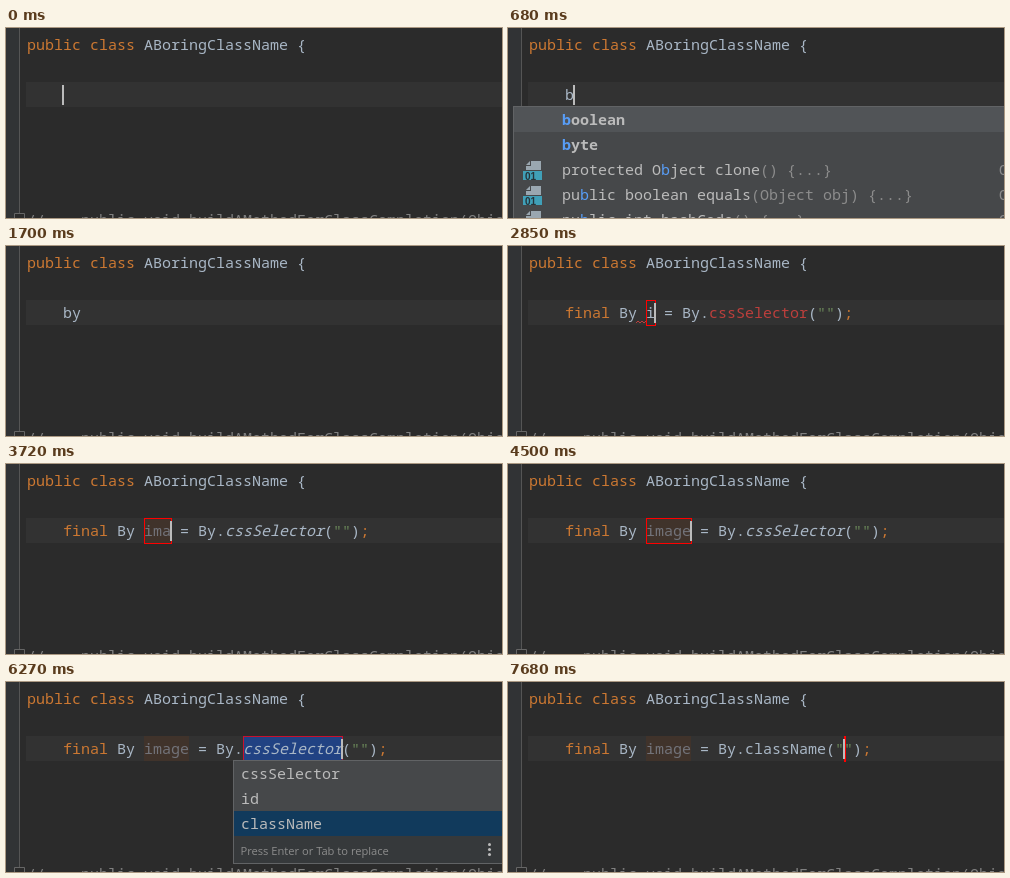
An HTML page that plays this animation: 496x190 px, repeating every 7990 ms.

```html
<!DOCTYPE html>
<html lang="en">
<head>
<meta charset="utf-8">
<title>Code completion</title>
<style>
  html, body { margin: 0; width: 100%; height: 100%; overflow: hidden; background: #2b2b2b; }
  #stage {
    position: relative; width: 496px; height: 190px; overflow: hidden;
    background: #2b2b2b; color: #a9b7c6;
    font: 15px/25px "Noto Sans Mono", monospace; white-space: pre;
  }
  #stage div, #stage svg { position: absolute; }
  .gutter { left: 0; top: 0; width: 13px; height: 190px; background: #313335; border-right: 1px solid #555; }
  .current { left: 20px; right: 0; top: 54px; height: 25px; background: #323232; }
  .keyword, .semi { color: #cc7832; }
  .string { color: #6a8759; }
  .comment { color: #808080; }
  .tail { color: #8c8c8c; }
  .unused { color: #72737a; }
  .error { color: #bc3f3c; }
  .static { font-style: italic; }
  .usage { background: #40332b; }
  .selection { background: #214283; }
  .usage, .selection { top: 54px; height: 25px; }
  .box { top: 54px; height: 26px; border: 1px solid #f00; box-sizing: border-box; }
  .box.dim { border-color: #c8102e; }
  .caret { top: 57px; width: 2px; height: 20px; background: #bbb; }
  .popup {
    top: 78px; right: 0; background: #46484a; color: #bbb; overflow: hidden;
    border: 1px solid #616365; border-right: 0;
  }
  .popup .row { left: 0; right: 0; height: 25px; }
  .row.grey { background: #515457; }
  .row.blue { background: #113a5c; }
  .popup .row.hint { height: 27px; background: #36393b; color: #8c8c8c; font: 11.15px/29px "Open Sans", sans-serif; }
  .row span { position: absolute; }
  .row span span { position: static; }
  .match { color: #589df6; }
  .dots { right: 11px; top: 7px; width: 3px; height: 3px; border-radius: 50%; background: #bbb; box-shadow: 0 5px #bbb, 0 10px #bbb; }
</style>
</head>
<body>
<div id="stage">
  <div class="gutter"></div>
  <div class="current"></div>
  <div style="left:21px;top:4px"><span class="keyword">public class</span> ABoringClassName {</div>
  <div class="comment" style="left:21px;top:179px">//    public void buildAMethodForClassCompletion(Object</div>
  <svg style="left:8px;top:185px" width="12" height="12"><path d="M.5 .5h10v10h-10z M3 5.5h5" fill="#2b2b2b" stroke="#666"/></svg>
  <div id="live" style="left:0;top:0;width:496px;height:190px"></div>
</div>
<script>
const LOOP = 7990;
const ROW = 25;
const live = document.getElementById('live');
const colX = col => 57 + 9 * col;
const span = (cls, text) => `<span class="${cls}">${text}</span>`;
const block = (cls, left, width) => `<div class="${cls}" style="left:${left}px;width:${width}px"></div>`;

// Each step changes part of the state at the given time.
const steps = [
  [0, { text: '', caret: 0 }],
  [70, { caret: null }],
  [600, { text: 'b', caret: 1 }],
  [680, { popup: 'b' }],
  [1070, { text: 'by', caret: 2, popup: 'by' }],
  [1620, { popup: null }],
  [1700, { caret: null }],
  [1780, { text: null, name: '', method: 'cssSelector', style: '', box: [9, 0], caret: 9 }],
  [2090, { style: 'error', wave: true }],
  [2850, { name: 'i', box: [9, 1], caret: 10 }],
  [2930, { name: 'im', box: [9, 2], caret: 11 }],
  [3250, { name: 'ima', box: [9, 3], caret: 12, wave: false }],
  [3640, { unused: 3, usage: true }],
  [3720, { style: 'static' }],
  [3790, { name: 'imag', box: [9, 4], caret: 13 }],
  [4110, { name: 'image', box: [9, 5], caret: 14 }],
  [4420, { unused: 5 }],
  [4730, { selected: true, box: [20, 11], caret: 31, popup: 'method', choice: 0 }],
  [5580, { caret: null }],
  [5660, { choice: 1 }],
  [6120, { caret: 31 }],
  [6270, { choice: 2 }],
  [6590, { caret: null }],
  [7050, { caret: 31 }],
  [7600, { method: 'className', style: '', selected: false, popup: null, box: [20, 9], caret: 29 }],
  [7680, { box: [31, 0], caret: 31 }]
];

const popup = (left, height, rows) => `<div class="popup" style="left:${left}px;height:${height}px">${rows}</div>`;
const row = (i, cls, body) => `<div class="row ${cls}" style="top:${ROW * i}px">${body}</div>`;
const label = (x, html, style = '') => `<span style="left:${x}px;${style}">${html}</span>`;
const hint = (i, x, text) => row(i, 'hint', label(x, text) + '<div class="dots"></div>');
const icon = `<svg style="left:9px;top:4px" width="20" height="20">
  <path d="M8 0H18V9H3V5H8z M3 4L7 0V4z" fill="#9aa7b0"/><path d="M0 10H19V19H0z" fill="#40a0b8"/>
  <text x="2" y="18.5" font-family="Liberation Sans, sans-serif" font-size="10" font-weight="bold" fill="#26343a">01</text></svg>`;

const keywordRow = (i, match, rest, cls = '') =>
  row(i, cls, label(48, span('match', match) + rest, 'font-weight:bold'));
const methodRow = (i, before, after, params) =>
  row(i, '', icon + label(48, before + span('match', 'b') + after + span('tail', `(${params}) {...}`)) +
    label(485, span('tail', 'Object')));

const popups = {
  b: () => popup(5, 5 * ROW,
    keywordRow(0, 'b', 'oolean', 'grey') + keywordRow(1, 'b', 'yte') +
    methodRow(2, 'protected O', 'ject clone', '') +
    methodRow(3, 'pu', 'lic boolean equals', 'Object obj') +
    methodRow(4, 'pu', 'lic int hashCode', '')),
  by: () => popup(5, 2 * ROW + 27,
    keywordRow(0, 'by', '', 'grey') + keywordRow(1, 'by', 'te') +
    hint(2, 8, 'Press Enter to insert, Tab to replace')),
  method: s => popup(227, 3 * ROW + 27,
    ['cssSelector', 'id', 'className'].map((method, i) =>
      row(i, i === s.choice ? 'blue' : '', label(7, method))).join('') +
    hint(3, 6.5, 'Press Enter or Tab to replace'))
};

function codeLine(s) {
  if (s.text !== null) return s.text;
  const n = s.unused || 0;
  return span('keyword', 'final') + ' By ' + span('unused', s.name.slice(0, n)) + s.name.slice(n) +
    ' = By.' + span(s.style, s.method) + '(' + span('string', '""') + ')' + span('semi', ';');
}

function render(s) {
  let html = '';
  if (s.usage) html += block('usage', colX(9), 9 * s.name.length);
  if (s.selected) html += block('selection', colX(20), 99);
  html += `<div style="left:57px;top:54px">${codeLine(s)}</div>`;
  if (s.wave) html += '<svg style="left:128px;top:74px" width="10" height="5"><path d="M0 3l2-2 2 2 2-2 2 2 2-2" fill="none" stroke="#bc3f3c"/></svg>';
  if (s.box) {
    const [col, length] = s.box;
    html += block(s.selected ? 'box dim' : 'box', colX(col), Math.max(2, 9 * length + 1));
  }
  if (s.caret !== null) html += block('caret', colX(s.caret) - 1, 2);
  if (s.popup) html += popups[s.popup](s);
  live.innerHTML = html;
}

let shown = -1;
function frame() {
  const time = performance.now() % LOOP;
  const count = steps.filter(([at]) => at <= time).length;
  if (count !== shown) {
    shown = count;
    render(Object.assign({}, ...steps.slice(0, count).map(([, change]) => change)));
  }
  requestAnimationFrame(frame);
}
frame();
</script>
</body>
</html>
```
